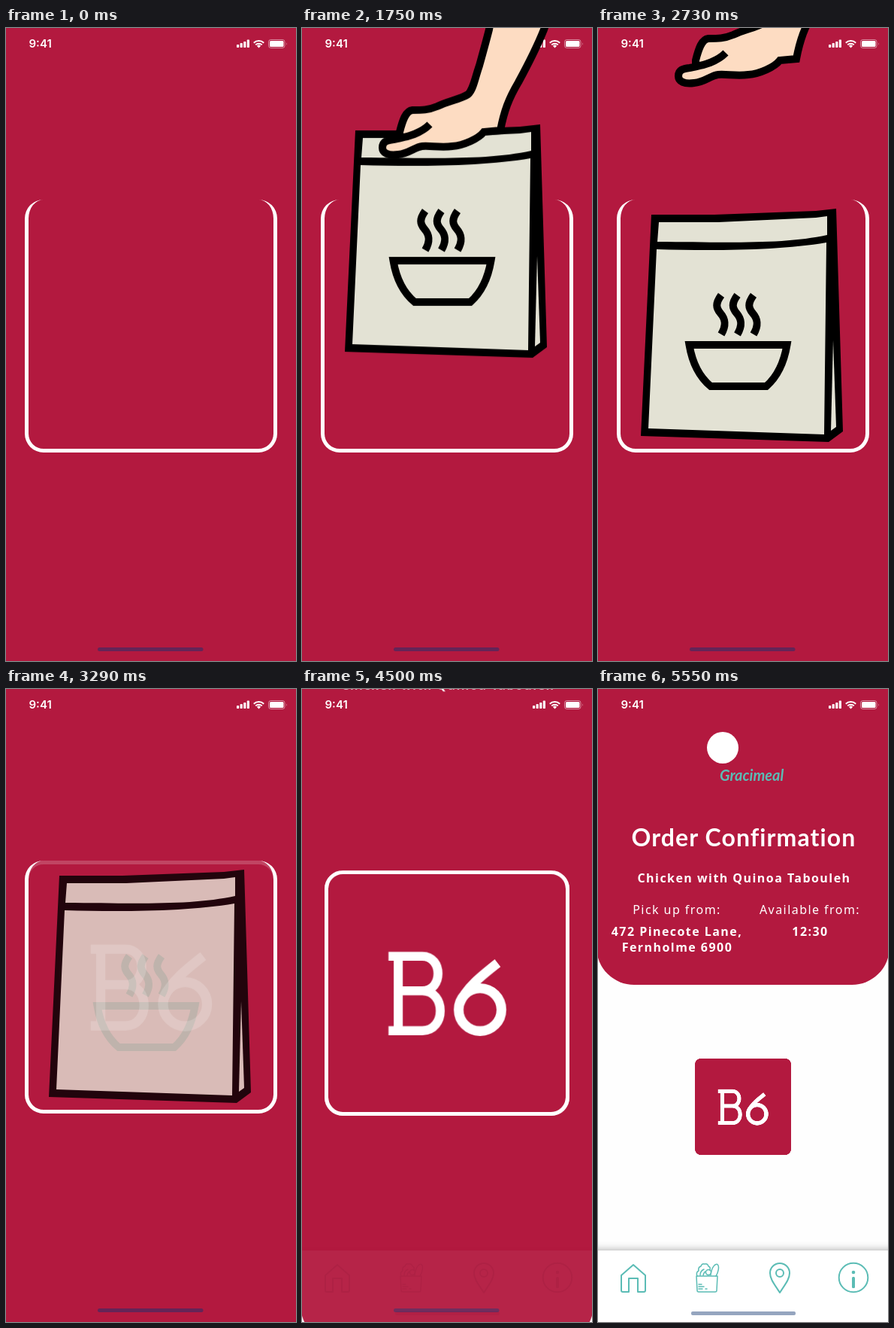
These frames come from a looping animation (386x841 px, 7.92 s). An HTML page:

```html
<!DOCTYPE html>
<html lang="en">
<head>
<meta charset="utf-8">
<title>Order pick-up</title>
<style>
  html, body { margin: 0; width: 100%; height: 100%; overflow: hidden; background: #fefefe; }
  svg { display: block; width: 100%; height: 100%; }

  :root { --red: #b3193f; --teal: #5bbcb5; --loop: 7920ms linear infinite; }
  .red { fill: var(--red); }
  .white { fill: #fff; }
  .cream { fill: #e3e2d4; }
  .line { fill: none; stroke: #fff; }
  .copy { font: 700 16px "Noto Sans", "Open Sans", sans-serif; letter-spacing: 1.45px; text-anchor: middle; fill: #fff; }
  .light { font-weight: 300; }
  .title { font: 700 32px Lato, sans-serif; letter-spacing: 1.1px; }
  .brand { font: italic 700 20px Lato, sans-serif; fill: var(--teal); }
  .clock { font: 600 15px Inter, sans-serif; fill: #fff; }
  .icons { fill: none; stroke: var(--teal); stroke-width: 2; stroke-linejoin: round; stroke-linecap: round; }
  .dot { fill: var(--teal); stroke: none; }
  .shade { filter: drop-shadow(0 0 6px rgba(0, 0, 0, .36)); }

  /* Bag is lowered, the hand leaves, the bag dissolves into the code. */
  .bag { animation: drop var(--loop), dissolve var(--loop); }
  .hand { animation: visit var(--loop); }
  .bowl { fill: none; stroke: #000; stroke-width: 10; animation: pale var(--loop); }
  .appear { animation: appear var(--loop); }

  /* The order screen unfolds. */
  .panel { animation: shrink var(--loop); }
  .box { transform-origin: 193px 396px; animation: box var(--loop); }
  .code { transform-origin: 193px 404.5px; animation: code var(--loop), appear var(--loop); }
  .head { animation: head var(--loop); }
  .left { animation: left var(--loop); }
  .right { animation: right var(--loop); }
  .nav { animation: show var(--loop); }
  .bar { animation: hide var(--loop); }

  @keyframes drop {
    0%, 12.87% { transform: translateY(-570px); animation-timing-function: ease-in-out; }
    26.2%, 100% { transform: translateY(0); }
  }
  @keyframes visit {
    0%, 12.87% { transform: translateY(-570px); animation-timing-function: ease-in-out; }
    26.2% { transform: translateY(0); animation-timing-function: ease-in-out; }
    39.46%, 100% { transform: translateY(-293px); }
  }
  @keyframes dissolve {
    0%, 39.55% { opacity: 1; animation-timing-function: ease-in-out; }
    46.17%, 100% { opacity: 0; }
  }
  @keyframes appear {
    0%, 39.55% { opacity: 0; animation-timing-function: ease-in-out; }
    46.17%, 100% { opacity: 1; }
  }
  @keyframes pale {
    0%, 39.55% { stroke: #000; }
    41.5%, 100% { stroke: #c3d8c6; }
  }
  @keyframes shrink {
    0%, 56.43% { transform: translateY(501px); animation-timing-function: ease-out; }
    69.65%, 100% { transform: translateY(0); }
  }
  @keyframes box {
    0%, 56.43% { transform: translateY(0) scale(1); animation-timing-function: ease-out; }
    69.65%, 100% { transform: translateY(159px) scale(.393); }
  }
  @keyframes code {
    0%, 56.43% { transform: translateY(-8px) scale(1.029); animation-timing-function: ease-out; }
    69.65%, 100% { transform: translateY(151px) scale(.427); }
  }
  @keyframes head {
    0%, 56.43% { transform: translateY(-270px); animation-timing-function: ease-out; }
    69.65%, 100% { transform: translateY(0); }
  }
  @keyframes left {
    0%, 56.43% { transform: translateX(-201px); animation-timing-function: ease-out; }
    69.65%, 100% { transform: translateX(0); }
  }
  @keyframes right {
    0%, 56.43% { transform: translateX(201px); animation-timing-function: ease-out; }
    69.65%, 100% { transform: translateX(0); }
  }
  @keyframes show {
    0%, 56.43% { opacity: 0; animation-timing-function: ease-out; }
    69.65%, 100% { opacity: 1; }
  }
  @keyframes hide {
    0%, 56.43% { opacity: 1; animation-timing-function: ease-out; }
    69.65%, 100% { opacity: 0; }
  }
</style>
</head>
<body>
<svg viewBox="0 0 386 841" preserveAspectRatio="none">
  <rect class="panel red" x="-2" y="-700" width="390" height="1093" rx="50"/>

  <g class="head">
    <circle class="white" cx="166" cy="78" r="21"/>
    <text class="brand" x="162" y="122">Gracimeal</text>
    <text class="copy title" x="194" y="209">Order Confirmation</text>
    <text class="copy" x="194.5" y="257">Chicken with Quinoa Tabouleh</text>
  </g>
  <g class="left">
    <text class="copy light" x="105" y="299">Pick up from:</text>
    <text class="copy" x="105" y="328">472 Pinecote Lane,</text>
    <text class="copy" x="105.5" y="349">Fernholme 6900</text>
  </g>
  <g class="right">
    <text class="copy light" x="282" y="299">Available from:</text>
    <text class="copy" x="282.5" y="328">12:30</text>
  </g>

  <g class="box">
    <rect class="red" x="28" y="229" width="330" height="333" rx="22"/>
    <path class="white" fill-rule="evenodd" d="M25 253a25 25 0 0 1 25-25H336a25 25 0 0 1 25 25V539a25 25 0 0 1-25 25H50a25 25 0 0 1-25-25Z
      M30 253a20 25 0 0 1 20-25H336a20 25 0 0 1 20 25V539a20 20 0 0 1-20 20H50a20 20 0 0 1-20-20Z"/>
    <rect class="line appear" x="27.5" y="230.5" width="331" height="331" rx="22.5" stroke-width="5"/>
  </g>

  <!-- Status bar -->
  <text class="clock" x="30.5" y="26">9:41</text>
  <g class="white">
    <rect x="307" y="22" width="3.2" height="4" rx=".8"/>
    <rect x="311.6" y="20" width="3.2" height="6" rx=".8"/>
    <rect x="316.2" y="18" width="3.2" height="8" rx=".8"/>
    <rect x="320.8" y="15.5" width="3.2" height="10.5" rx=".8"/>
    <path d="M336.5 26.5l-2.6-2.7a3.8 3.8 0 0 1 5.2 0Z"/>
    <rect x="351" y="17" width="18.5" height="8" rx="1.6"/>
    <path d="M373 19.2q1.6 1.8 0 3.8Z" opacity=".5"/>
  </g>
  <g class="line" stroke-width="2">
    <path d="M329.8 19.7a9.8 9.8 0 0 1 13.4 0M332.2 22.4a6.2 6.2 0 0 1 8.6 0"/>
    <rect x="349.5" y="15.5" width="21.5" height="11" rx="3" stroke-width="1" opacity=".5"/>
  </g>

  <g class="bag">
    <path d="M71 248H155L290 243L317 240L326 536L307 550L57 542Z"/>
    <g class="cream">
      <path d="M81 258H160L290 252L305 250V275C250 287 180 285 79 284Z"/>
      <path d="M78 294C150 296 240 296 304 285L301 540L67 532Z"/>
      <path d="M313 415L310 535L317 530Z"/>
    </g>
    <g class="bowl">
      <path d="M121.5 421H251.500C248 442 240 462 224 476H150C133 462 125 442 121.500 421Z"/>
      <path id="steam" d="M164 355C156 366 157 372 163 379C170 387 171 395 164 407"/>
      <use href="#steam" x="21.500"/>
      <use href="#steam" x="43"/>
    </g>
  </g>

  <g class="code line" role="img" aria-label="B6" stroke-width="12">
    <path d="M128 350V459M115 355H160C188 355 188 401 160 401H128M115 454H160C192 454 192 401 160 401"/>
    <circle cx="237" cy="426" r="28.500" stroke-width="13"/>
    <path d="M260.500 364C240 380 217 398 210 418" stroke-width="12.500"/>
  </g>

  <g class="hand">
    <path transform="translate(0 114)" fill="#fddcc2" stroke="#000" stroke-width="10" stroke-miterlimit="3"
      d="M130 136C134 120 138 108 147 107C160 107 168 107 180 102C195 95 212 92 221 86C228 80 230 65 236 48C241 30 246 12 249 0
      C253 -20 258 -60 258 -100V-220H332V-100C332 -50 332 -24 322 0C312 25 300 48 288 70C275 92 269 108 264 134L242 136
      C235 145 215 154 200 155C185 157 170 154 160 155C150 156 142 165 128 166C115 168 107 164 107 157C107 148 114 147 122 146
      C140 143 158 138 170 126C158 138 140 143 130 144Z"/>
  </g>

  <rect class="bar" x="122" y="823" width="140.500" height="5" rx="2.500" fill="#163070" fill-opacity=".5"/>

  <g class="nav">
    <rect class="white shade" x="-20" y="746" width="426" height="120"/>
    <g class="icons">
      <path d="M31 779L47 765L63 779V799q0 2-2 2H53V783H41V801H33q-2 0-2-2Z"/>
      <path d="M242 802C235 791 229 784 229 776a13 13 0 0 1 26 0C255 784 249 791 242 802Z"/>
      <circle cx="242" cy="776" r="5"/>
      <circle cx="340" cy="782" r="19.300"/>
      <circle class="dot" cx="340" cy="775" r="2.300"/>
      <rect class="dot" x="338" y="781" width="4" height="15" rx="1.500"/>
      <g stroke-width="1.500">
        <path d="M131 780H159L158 799q0 2-2 2H134q-2 0-2-2Z"/>
        <path d="M150 779C151 768 156 763 159 764.500C162 767 160 775 157 780"/>
        <path d="M132 780q-2-5 2-7q-1-5 3-6q1-4 5-3q4-1 5 3q3 1 2 5"/>
        <circle cx="147" cy="775" r="3.500"/>
        <path d="M136 779q0-6 5-8M140 779q1-4 3-5M134 791h4M134 794h7M134 797h5M143 797h2"/>
      </g>
    </g>
    <rect x="124" y="827" width="139" height="5" rx="2" fill="#95a5bf"/>
  </g>
</svg>
</body>
</html>
```
